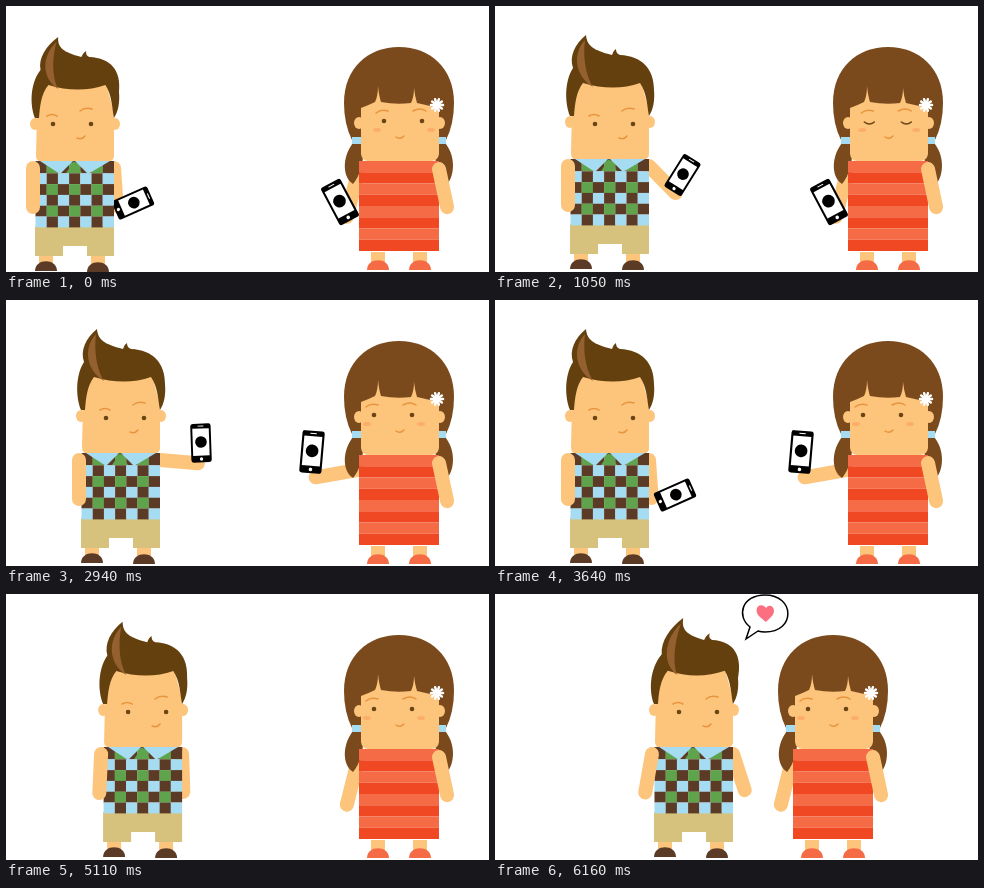
Write an HTML page with a canvas that moves like this. It is 483 by 266 pixels and loops after 7000 ms.

```html
<!DOCTYPE html>
<html>
<head>
<meta charset="utf-8">
<style>
html, body { margin: 0; width: 100%; height: 100%; overflow: hidden; background: #fff; }
canvas { display: block; }
</style>
</head>
<body>
<canvas id="stage" width="483" height="266"></canvas>
<script>
const ctx = document.getElementById('stage').getContext('2d');
const SKIN = '#fdc47c', BROWN = '#5b3a26', GREEN = '#5fa34c', BLUE = '#a5dcf2';
const LINE = '#e8943c', EYE = '#6b4514', RED = '#f04823', CORAL = '#f46b45';

const rect = (color, x, y, w, h) => { ctx.fillStyle = color; ctx.fillRect(x, y, w, h); };
const fill = (color, d) => { ctx.fillStyle = color; ctx.fill(new Path2D(d)); };
const stroke = (color, width, d) => {
  ctx.strokeStyle = color;
  ctx.lineWidth = width;
  ctx.stroke(new Path2D(d));
};
const oval = (color, x, y, rx, ry = rx) => {
  ctx.fillStyle = color;
  ctx.beginPath();
  ctx.ellipse(x, y, rx, ry, 0, 0, 7);
  ctx.fill();
};
const rad = deg => deg * Math.PI / 180;
const ramp = (t, start, end) => Math.min(1, Math.max(0, (t - start) / (end - start)));

function moved(x, y, draw) {
  ctx.save();
  ctx.translate(x, y);
  draw();
  ctx.restore();
}

// Angle is measured from hanging straight down, positive to the right.
function arm(x, y, deg, length) {
  const a = rad(deg);
  stroke(SKIN, 14, `M${x},${y}L${x + length * Math.sin(a)},${y + length * Math.cos(a)}`);
}

function phone(x, y, deg, scale) {
  moved(x, y, () => {
    ctx.rotate(rad(deg));
    ctx.scale(scale, scale);
    ctx.fillStyle = '#000';
    ctx.beginPath();
    ctx.roundRect(-10.5, -20, 21, 40, 2.5);
    ctx.fill();
    rect('#fff', -8.5, -15, 17, 28);
    rect('#fff', -3, -18, 6, 1);
    oval('#fff', 0, 16.5, 1.7);
    oval('#000', 0, -1, 6);
  });
}

function foot(color, x, y) {
  rect(SKIN, x - 7, y - 18, 14, 12);
  fill(color, `M${x - 11},${y}C${x - 11},${y - 13} ${x + 11},${y - 13} ${x + 11},${y}Z`);
}

function shirt() {
  rect(BROWN, 75.5, 153, 78.5, 4);
  for (let row = 0; row < 6; row++)
    for (let col = 0; col < 7; col++) {
      const even = col % 2 === 0;
      const color = row % 2 ? (even ? BLUE : BROWN) : (even ? BROWN : GREEN);
      rect(color, 75.5 + col * 11.2, 154.5 + row * 10.8, 11.3, 10.9);
    }
  fill(BLUE, 'M80,153H113L100,166ZM115,153H150L128,166Z');
  fill(GREEN, 'M114,153L106,165H122Z');
}

function boyHair(sway, lift) {
  const bend = d => d.replace(/(\d+),(\d+)/g, (_, u, v) => {
    const up = Math.max(0, 80 - v);
    return `${+u + sway * up},${v - lift * up / 50}`;
  });
  fill('#65400f', bend('M75,110C70,98 69,76 78,62C74,50 80,38 91,29C92,40 98,44 117,49' +
    'C118,47 118,45 121,43C121,46 122,48 125,49C147,50 159,63 159,84C160,95 158,104 154,110' +
    'C152,100 152,87 145,77C128,83 108,83 88,77C81,86 80,98 79,110Z'));
  fill('#95602f', bend('M90,34C77,48 80,70 98,81C90,68 88,50 90,34Z'));
}

function boy(t) {
  const arrive = ramp(t, 0, 700), away = 1 - arrive, step = Math.sin(Math.PI * arrive);
  const leave = ramp(t, 5010, 5390);
  const raise = ramp(t, 770, 1330) - ramp(t, 2940, 3500);
  const drop = ramp(t, 3710, 4200), stow = ramp(t, 4200, 4480);
  const turn = -7 * away, y = 2 * away - 3 * step;

  moved(84 * leave - 46 * away, y, () => {
    arm(154, 160, 4 + 81 * raise - 8 * drop + 22 * leave, 38);
    if (stow < 1)
      phone(180 + 15 * raise - 10 * drop - 45 * stow + turn, 195 - 52 * raise + 6 * drop,
        66 - 68 * raise + 32 * drop, .97);
    foot(BROWN, 86, 263);
    foot(BROWN, 138, 264);
    fill('#d6c27c', 'M75,218H154V248H127V238H103V248H75Z');
    shirt();

    oval(SKIN, 75, 116, 5, 6);
    oval(SKIN, 155, 116, 5, 6);
    fill(SKIN, 'M77,105L86,75H146L154,105V148Q154,153 149,153H80Q76,153 76,147Z');
    boyHair(.14 * away + .26 * leave, 6 * step + 5 * leave);

    moved(turn, -y, () => {
      oval(EYE, 100, 118, 2.3);
      oval(EYE, 138, 118, 2.3);
      stroke(LINE, 1.5, 'M94,110Q99,107 104,110M127,105Q132,101 139,103M124,132Q129,134 132,130');
    });
    arm(73, 160, -10 * leave, 39);
  });
}

function flower(x, y) {
  for (let deg = 0; deg < 180; deg += 36) {
    const u = 6 * Math.cos(rad(deg)), v = 6 * Math.sin(rad(deg));
    stroke('#fff', 2.5, `M${x - u},${y - v}L${x + u},${y + v}`);
  }
}

function girl(t) {
  const drop = ramp(t, 3710, 4200), stow = ramp(t, 4200, 4480);
  const raise = ramp(t, 2450, 2870) - drop;
  const wave = ramp(t, 1190, 1470) - ramp(t, 1750, 2030);

  moved(-55 * ramp(t, 5250, 5670), 0, () => {
    arm(351, 170, -14 - 66 * raise, 42);
    if (stow < 1)
      phone(334 - 28 * raise - drop + 45 * stow, 196 - 44 * raise + 11 * drop,
        -28 + 33 * raise - 52 * drop, 1.06);
    fill('#7a4a1d', 'M348,136C337,148 335,170 347,178Q358,165 358,136Z' +
      'M438,136C450,148 449,170 441,178Q428,165 428,136Z');
    fill('#7a4a1d', 'M346,134Q338,118 338,97C338,62 362,41 393,41S448,62 448,97Q448,118 440,134Z');
    rect(BLUE, 346, 131, 10, 7);
    rect(BLUE, 430, 131, 10, 7);
    foot(CORAL, 372, 264);
    foot(CORAL, 414, 264);
    for (let i = 0; i < 8; i++)
      rect(i % 2 ? RED : CORAL, 353, 155 + i * 11.25, 80, 11.25);

    oval(SKIN, 353, 117, 5, 6);
    oval(SKIN, 434, 117, 5, 6);
    fill(SKIN, 'M355,102Q363,99 369,96Q372,90 372,80Q373,90 375,96Q390,99 405,97' +
      'Q408,91 408,82Q409,91 411,97Q422,100 433,101V148Q432,155 425,155H362Q356,155 355,148Z');
    flower(431, 99);

    moved(4 - 10 * ramp(t, 0, 2870), 0, () => {
      oval('#fcae68', 367, 124, 4, 2);
      oval('#fcae68', 421, 124, 4, 2);
      if (t >= 980 && t < 1190) {
        stroke(EYE, 1.5, 'M369,116Q374,120 379,116M406,116Q411,120 416,116');
      } else {
        oval(EYE, 374, 115, 2.3);
        oval(EYE, 412, 115, 2.3);
      }
      stroke(LINE, 1.5, 'M366,107Q371,103 378,105M403,105Q410,101 416,105');
    });
    stroke(LINE, 1.5, 'M390,131Q394,134 398,130');
    arm(433, 163, 12 + 93 * wave, 39);
  });
}

function bubble(t) {
  const size = ramp(t, 5670, 5880);
  if (!size) return;
  moved(251, 46, () => {
    ctx.scale(size, size);
    ctx.translate(-251, -46);
    const d = 'M255,33C241,22 247,1 270,1C300,1 301,38 270,38Q266,38 263,37L251,45Z';
    fill('#fff', d);
    stroke('#000', 1.5, d);
    fill('#fb6f80', 'M271,28C265,23 260,20 262,14C264,10 269,11 271,14C274,10 279,12 279,17C279,21 275,24 271,28Z');
  });
}

function draw(now) {
  const t = Math.min(6160, Math.floor(now % 7000 / 70) * 70);
  rect('#fff', 0, 0, 483, 266);
  ctx.lineCap = 'round';
  boy(t);
  girl(t);
  bubble(t);
  requestAnimationFrame(draw);
}
draw(performance.now());
</script>
</body>
</html>
```
